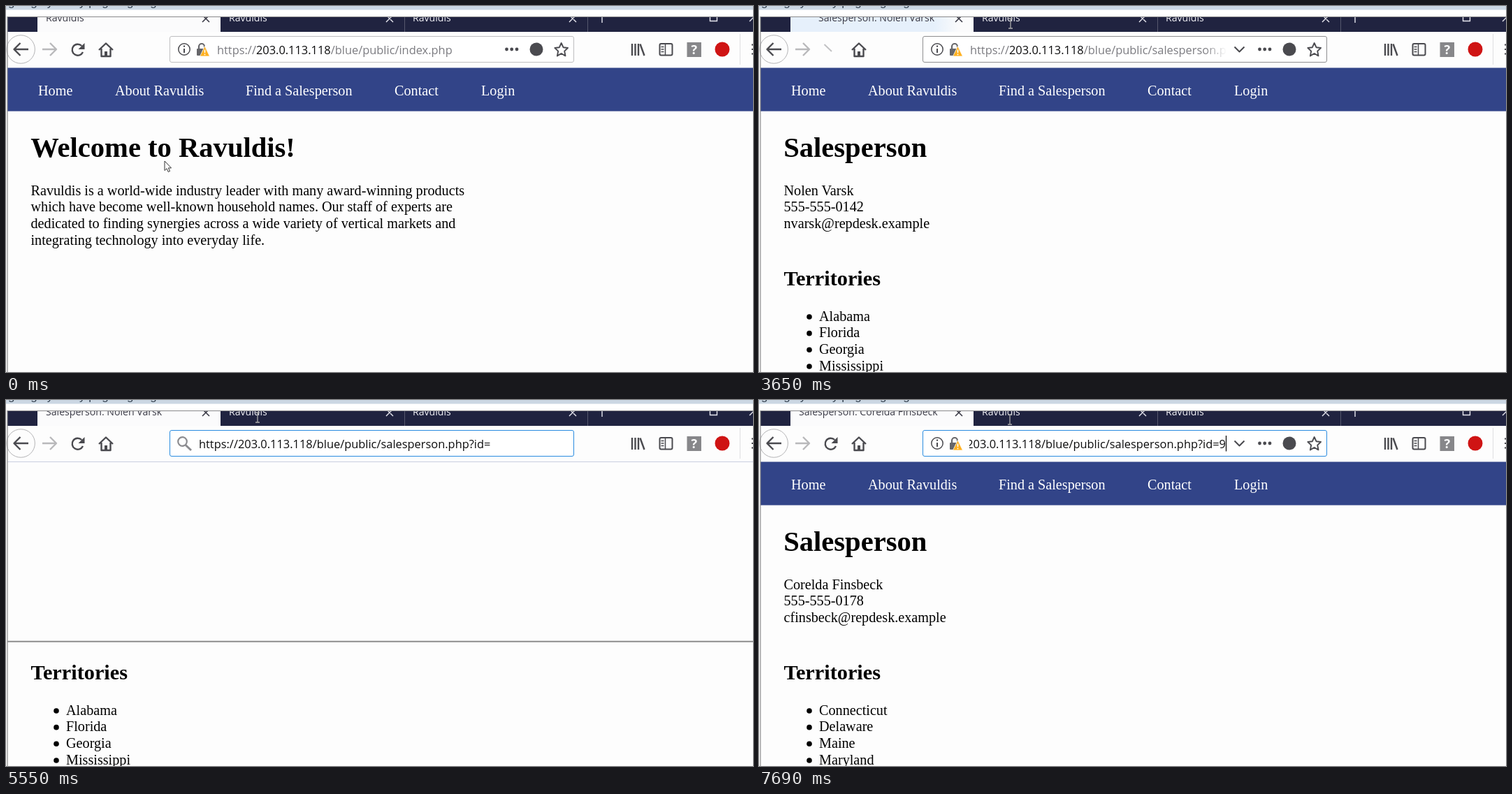
Write an HTML page that moves like this. It is 1069 px wide and 524 px high and loops after 8000 ms.

```html
<!DOCTYPE html>
<html lang="en">
<head>
<meta charset="utf-8">
<title>Browser session</title>
<style>
html, body { margin: 0; width: 100%; height: 100%; overflow: hidden; background: #fff; }
svg { display: block; width: 100%; height: 100%; }
text { white-space: pre; }
.page, .nav { font: 20.2px "Liberation Serif", "Times New Roman", serif; }
.nav { fill: #fff; }
.h1 { font-size: 40.6px; font-weight: bold; }
.h2 { font-size: 30.3px; font-weight: bold; }
.b { font-weight: bold; }
.link { fill: #00e; text-decoration: underline; }
.tab { font: 14.1px "Open Sans", "Noto Sans", sans-serif; fill: #3a3a46; }
.url { font: 16.4px "Open Sans", "Noto Sans", sans-serif; fill: #7b7b80; }
.url .host, .url .typed { fill: #0c0c0d; }
.icon { fill: none; stroke: #4a4a4f; stroke-width: 2.4; stroke-linejoin: round; }
</style>
</head>
<body>
<svg viewBox="0 0 1069 524">
  <defs>
    <clipPath id="tabClip"><rect x="2" y="16" width="1067" height="21"/></clipPath>
    <clipPath id="urlClip"><rect x="301" y="45" width="367.5" height="34"/></clipPath>
    <linearGradient id="fade"><stop stop-color="#fff" stop-opacity="0"/><stop offset="1" stop-color="#fff"/></linearGradient>
    <linearGradient id="burst"><stop offset=".85" stop-color="#e6f0fb"/><stop offset="1" stop-color="#e6f0fb" stop-opacity="0"/></linearGradient>
  </defs>

  <!-- strip above the window -->
  <rect width="1069" height="5.5" fill="#cbd7e3"/>
  <text x="3" y="0" font-family="Liberation Sans, Arial, sans-serif" font-size="17" fill="#33404f">going by every page sign again</text>
  <rect x="2" y="16" width="1067" height="508" fill="#fdfdfd"/>

  <!-- tabs -->
  <g clip-path="url(#tabClip)">
    <rect x="2" y="16" width="1067" height="21" fill="#202340"/>
    <rect x="45" y="16" width="262" height="21" fill="#fbfbfc"/>
    <rect x="45" y="16" width="242" height="21" fill="url(#burst)" data-t="3560-3870 6900-7050"/>
    <path d="M570.5 16V37M832.5 16V37" stroke="#55576d"/>
    <circle id="dot" cy="16" r="3.6" fill="#55555c" data-t="1320-3560 6050-6900"/>
    <g id="titles" class="tab"></g>
    <g class="tab" style="fill:#f0f0f5"><text x="319" y="22">Ravuldis</text><text x="582" y="22">Ravuldis</text></g>
    <path d="M281 13l10 10m0-10l-10 10" stroke="#3a3a46" stroke-width="1.6"/>
    <path d="M544 13l10 10m0-10l-10 10M806 13l10 10m0-10l-10 10M853 10v14M1007.5 12v9.5h10V12M1074 12l-10 10" fill="none" stroke="#e6e6ee" stroke-width="1.4"/>
  </g>

  <!-- toolbar -->
  <circle cx="21.2" cy="62" r="20.2" fill="#fdfdfd" stroke="#b4b4b6"/>
  <path class="icon" d="M32 62H12M20.5 53L11.5 62L20.5 71"/>
  <path class="icon" style="stroke:#b9b9bb" d="M52 62H71M63 53L72 62L63 71"/>
  <g data-t="0-1400 2100-3050 3760-6050 7150-8000">
    <path class="icon" d="M110 66A8 8 0 1 1 108.3 57"/>
    <path d="M112.5 53V62H103.5Z" fill="#4a4a4f"/>
  </g>
  <path class="icon" d="M95 54L111 71M111 54L95 71" data-t="1400-2100 3050-3560 6050-7050"/>
  <path d="M93.5 55L104 65" stroke="#c2c2c4" stroke-width="2" data-t="3560-3760 7050-7150"/>
  <path class="icon" d="M133 63L143 53.5L153 63M136.5 61V72H149.5V61"/>
  <rect x="141" y="65" width="4" height="7" fill="#4a4a4f"/>

  <rect id="bar" x="234.5" y="43.5" width="578" height="37" rx="2.5" fill="#fff"/>
  <g data-t="0-5430 6700-8000">
    <circle cx="255" cy="62" r="8.2" class="icon" style="stroke-width:1.5"/>
    <path d="M255 61v6M255 56.5v2.2" stroke="#4a4a4f" stroke-width="2"/>
    <path d="M276 62V58a4 4 0 0 1 8 0V62" fill="none" stroke="#66666a" stroke-width="2.2"/>
    <rect x="273" y="61" width="14" height="10" rx="1" fill="#66666a"/>
    <path d="M284.5 57.5L291.5 72H277.5Z" fill="#ffb01f" stroke="#fff" stroke-width=".8"/>
    <path d="M284.5 62.5v4.5M284.5 68.5v1.8" stroke="#fff" stroke-width="1.6"/>
    <g fill="#4a4a4f"><circle cx="716.5" cy="62" r="2.4"/><circle cx="723.7" cy="62" r="2.4"/><circle cx="731" cy="62" r="2.4"/><circle cx="759" cy="62" r="9.5"/></g>
    <path class="icon" style="stroke-width:1.9" d="M794.7 53L797.5 59.2L804 60L799.2 64.6L800.5 71.4L794.7 68L788.9 71.4L790.2 64.6L785.4 60L791.9 59.2Z"/>
  </g>
  <path class="icon" style="stroke-width:2" d="M680.5 58.5L687.5 65.5L694.5 58.5" data-t="3250-5430 6700-8000"/>
  <g data-t="5430-6700" fill="none" stroke="#8c8c90" stroke-width="2.2"><circle cx="252.5" cy="59.5" r="6.3"/><path d="M257 64.5l8 7.5" stroke-width="3"/></g>
  <g id="urls" class="url"></g>
  <rect x="638" y="48" width="31" height="28" fill="url(#fade)" data-t="1600-4100 6700-7150"/>
  <path d="M668.5 51V73.5" stroke="#000" stroke-width="1.2" data-t="4550-4860 7690-8000"/>

  <path d="M896 54V71M900.5 54V71M905 54V71" class="icon"/>
  <path d="M907.5 54.5L913.5 71" class="icon"/>
  <rect x="935.5" y="54" width="18" height="16.5" rx="2" class="icon" style="stroke-width:2"/>
  <path d="M943.5 54V70M937.5 58.5h4M937.5 62h4M937.5 65.5h4" stroke="#4a4a4f" stroke-width="1.5"/>
  <rect x="974.5" y="52" width="20.5" height="21" fill="#87878a"/>
  <text x="984.8" y="69" text-anchor="middle" fill="#fff" font-family="Open Sans, sans-serif" font-weight="bold" font-size="18">?</text>
  <circle cx="1025" cy="62" r="10.5" fill="#cf1414"/>
  <path d="M1050.5 40V84" stroke="#dedee0"/>
  <path d="M1067 55.5h2M1067 62h2M1067 68.5h2" stroke="#4a4a4f" stroke-width="2"/>

  <!-- page -->
  <rect x="2" y="88.5" width="1067" height="62.1" fill="#324488"/>
  <g class="nav"><text x="46" y="128">Home</text><text x="156" y="128">About Ravuldis</text><text x="343" y="128">Find a Salesperson</text><text x="556" y="128">Contact</text><text x="680" y="128">Login</text></g>
  <g id="pages" class="page"></g>

  <rect id="panel" x="2" y="88.5" width="1067" fill="#fdfdfd" data-t="5420-6000"/>
  <path id="edge" d="M2 0H1069" stroke="#8d8d8d" stroke-width="2" data-t="5320-6000"/>
  <path d="M1069 15.5H2V524" fill="none" stroke="#8a8a8c" stroke-width="1.2"/>

  <g id="cursor">
    <path d="M0 0V13.5L3 10.7L5.2 15.5L7.5 14.5L5.4 9.9H9.5Z" fill="#fff" stroke="#333" data-t="0-430 3150-3400"/>
    <path d="M-1.5 1.2Q0 -.8 1.5 1.2V6Q3 5.2 4 6.5Q5.5 5.8 6.3 7.2Q8 7 8 9V12L6.5 16.5H-.5L-5 10.5Q-5 8.5 -3.3 9L-1.5 10.5Z" fill="#fff" stroke="#333" data-t="740-3150"/>
    <path d="M-3 -7H3M0 -7V7M-3 7H3" fill="none" stroke="#aaa" stroke-width="1.3" data-t="430-740 3400-8000"/>
  </g>
</svg>
<script>
const LOOP = 8000, LINE = 23.65;
const $ = id => document.getElementById(id);
const add = (id, markup) => $(id).insertAdjacentHTML('beforeend', markup);
const text = (x, y, s, cls = '') => `<text x="${x}" y="${y}" class="${cls}">${s}</text>`;
const lines = (y, list) => list.map((s, i) => text(35.5, y + i * LINE, s)).join('');
const group = (t, body) => `<g data-t="${t}">${body}</g>`;
const heading = s => text(35.2, 215.8, s, 'h1');

// tab titles
const title = (t, x, s) => add('titles', group(t, text(x, 22, s)));
const people = ['Nolen Varsk', 'Corelda Finsbeck'];
title('0-1320', 57, 'Ravuldis');
title('1320-1600', 85, 'Ravuldis');
title('1600-3400', 85, 'Find a Salesperson');
title('3400-3870 6050-6700', 85, 'Salesperson: ' + people[0]);
title('3870-6050', 57, 'Salesperson: ' + people[0]);
title('6700-7050', 85, 'Salesperson: ' + people[1]);
title('7050-8000', 57, 'Salesperson: ' + people[1]);

// address bar
const host = '203.0.113.118', dir = '/blue/public/', person = dir + 'salesperson.php?id=';
const full = path => `https://${host}${path}`;
const toned = path => `https://<tspan class="host">${host}</tspan>${path}`;
const address = (t, body) => add('urls', group(t, body));
const clipped = body => `<g clip-path="url(#urlClip)">${body}</g>`;
const idle = (t, path) => address(t, clipped(text(302, 69, toned(path))));
const typing = (t, path) => address(t, text(276, 69, full(path), 'typed'));
const selected = (t, path) => address(t, clipped(
  `<rect x="301" y="50.5" width="368" height="23" fill="#0078d7"/><text x="302" y="69" fill="#fff">${full(path)}</text>`));
const scrolled = (t, path) => address(t, clipped(
  `<text x="668" y="69" text-anchor="end" class="typed">${full(path)}</text>`));
idle('0-1600', dir + 'index.php');
idle('1600-3250', dir + 'territories.php');
idle('3250-4100', person + 1);
selected('4100-4550', person + 1);
scrolled('4550-5430', person + 1);
typing('5430-5650', person);
typing('5650-6000', person + 9);
address('6000-6700', text(276, 69, toned(person + 9)));
idle('6700-7150', person + 9);
selected('7150-7690', person + 9);
scrolled('7690-8000', person + 9);

// pages
add('pages', group('0-1960', heading('Welcome to Ravuldis!') + lines(270.7, [
  'Ravuldis is a world-wide industry leader with many award-winning products',
  'which have become well-known household names. Our staff of experts are',
  'dedicated to finding synergies across a wide variety of vertical markets and',
  'integrating technology into everyday life.'])));

const regions = [['Alabama (AL)', people[0]], ['Alaska (AK)', 'Oswell Tambrick'], ['Arizona (AZ)', 'Selba Purnig']];
add('pages', group('1960-3430', heading('Find a Salesperson') +
  text(35.5, 270.7, 'Use the list below to find a salesperson nearby. We are ready to serve you!') +
  text(35.5, 314.5, 'UNITED STATES', 'b') +
  regions.map(([state, name], i) => {
    const y = 358.4 + i * 67.2;
    return text(35.5, y, state) + text(86, y + LINE, name, 'link') +
      `<rect x="68.5" y="${y + 14.5}" width="7" height="7"/>`;
  }).join('')));

const profile = (t, name, phone, mail, states) => add('pages', group(t,
  heading('Salesperson') + lines(270.7, [name, phone, mail + '@repdesk.example']) +
  text(35.5, 399.5, 'Territories', 'h2') +
  states.map((s, i) => text(86, 450.7 + i * LINE, s) +
    `<circle cx="72" cy="${445 + i * LINE}" r="3.8"/>`).join('')));
profile('3430-6800', people[0], '555-555-0142', 'nvarsk', ['Alabama', 'Florida', 'Georgia', 'Mississippi']);
profile('6800-8000', people[1], '555-555-0178', 'cfinsbeck', ['Connecticut', 'Delaware', 'Maine', 'Maryland']);

// pointer path: time, x, y
const path = [[0, 227, 222], [129, 227, 222], [130, 222, 203], [309, 222, 203], [530, 290, 29], [760, 350, 50],
  [990, 380, 95], [1600, 380, 95], [1850, 285, 95], [2080, 250, 130], [2210, 240, 140], [2650, 104, 237],
  [2860, 104, 237], [3080, 125, 320], [3300, 200, 200], [3540, 350, 17], [3650, 360, 25], [6900, 360, 25],
  [7050, 359, 28], [LOOP, 359, 28]];
function pointer(t) {
  const i = path.findIndex(p => p[0] > t);
  const [a, b] = [path[i - 1], path[i]], k = (t - a[0]) / (b[0] - a[0]);
  return [a[1] + (b[1] - a[1]) * k, a[2] + (b[2] - a[2]) * k];
}

const timed = [...document.querySelectorAll('[data-t]')].map(el =>
  ({ el, spans: el.dataset.t.split(' ').map(s => s.split('-').map(Number)) }));
const within = (t, spans) => spans.some(([a, b]) => t >= a && t < b);
const focused = [[3870, 6000], [7050, LOOP]], hovered = [[430, 740], [3450, 3870], [6000, 7050]];

function draw(t) {
  for (const { el, spans } of timed) el.style.display = within(t, spans) ? '' : 'none';
  $('bar').setAttribute('stroke', within(t, focused) ? '#2a8ce0' : within(t, hovered) ? '#8e8e90' : '#bebec0');
  $('dot').setAttribute('cx', 67 + 8 * Math.cos((t - 1850) / 1010 * 3 * Math.PI));
  const grow = Math.min(1, Math.max(0, (t - 5420) / 220)), y = 214 + 223 * grow;
  $('panel').setAttribute('height', y - 88.5);
  $('edge').setAttribute('transform', `translate(0 ${y})`);
  $('cursor').setAttribute('transform', `translate(${pointer(t)})`);
}

let start;
function tick(now) {
  start ??= now;
  draw((now - start) % LOOP);
  requestAnimationFrame(tick);
}
draw(0);
requestAnimationFrame(tick);
</script>
</body>
</html>
```
